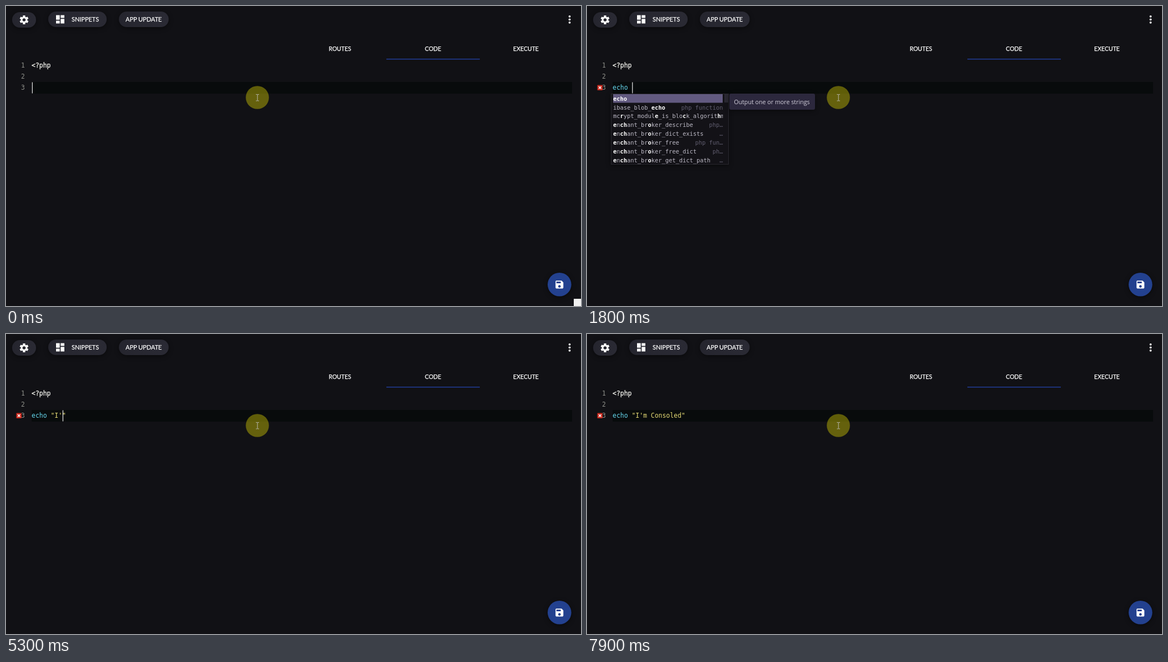
An HTML page for the animation above (8 s loop, 1034 by 541 pixels).

```html
<!DOCTYPE html>
<html lang="en">
<head>
<meta charset="utf-8">
<title>Code editor</title>
<style>
html, body { margin: 0; width: 100%; height: 100%; overflow: hidden; background: #111115; }
svg { display: block; width: 1034px; height: 541px; }
text { white-space: pre; }
.ui { font: 10.5px Lato, sans-serif; fill: #fff; stroke: #fff; stroke-width: .25; }
.btn { font-size: 10.95px; }
.code { font: 11.43px "DejaVu Sans Mono", monospace; fill: #f8f8f2; }
.num { fill: #8f908a; text-anchor: end; }
.row { font: 10.38px "DejaVu Sans Mono", monospace; fill: #bdbac6; }
.row .hit { font-weight: bold; fill: #fff; }
.row.on { fill: #a9a3bb; }
.row.meta { fill: #615e70; text-anchor: end; }
.tip { font: 10.69px "Open Sans", sans-serif; fill: #d3d0dc; }
.pop { filter: drop-shadow(0 2px 4px rgba(0, 0, 0, .45)); }
</style>
</head>
<body>
<svg viewBox="0 0 1034 541">
  <defs>
    <linearGradient id="pill" x1="0" x2="1">
      <stop offset="0" stop-color="#25252e"/><stop offset="1" stop-color="#2a2a34"/>
    </linearGradient>
  </defs>
  <rect width="1034" height="541" fill="#111115"/>
  <g class="pop" fill="url(#pill)">
    <rect x="11" y="11" width="43" height="28" rx="14"/>
    <rect x="76" y="10" width="105" height="28" rx="14"/>
    <rect x="203" y="10" width="89.500" height="28" rx="14"/>
  </g>
  <g id="gear" transform="translate(32.500 25)" fill="#fff"></g>
  <path fill="#fff" transform="translate(87.500 14) scale(.83)" d="M3 13h8V3H3zm0 8h8v-6H3zm10 0h8V11h-8zm0-18v6h8V3z"/>
  <text class="ui btn" x="118" y="27.500">SNIPPETS</text>
  <text class="ui btn" x="215" y="27.500">APP UPDATE</text>
  <g fill="#fff">
    <circle cx="1013.500" cy="18.800" r="1.900"/><circle cx="1013.500" cy="24.300" r="1.900"/><circle cx="1013.500" cy="29.800" r="1.900"/>
  </g>
  <g class="ui" text-anchor="middle">
    <text x="600.500" y="81">ROUTES</text><text x="768" y="81">CODE</text><text x="935" y="81">EXECUTE</text>
  </g>
  <rect x="684" y="95" width="168" height="1.500" fill="#213c98"/>
  <rect x="46" y="137" width="972" height="21" fill="#080b0c"/>
  <g class="code">
    <text class="num" x="34" y="110.600">1</text>
    <text class="num" x="34" y="131">2</text>
    <text class="num" x="34" y="151.200">3</text>
    <text x="46" y="110.600" stroke="#f8f8f2" stroke-width=".25">&lt;?php</text>
  </g>
  <g class="pop"><circle cx="995.300" cy="502.300" r="21.300" fill="#23418f"/></g>
  <path fill="#fff" transform="translate(985.900 493) scale(.78)" d="M17 3H5c-1.110 0-2 .9-2 2v14c0 1.100.89 2 2 2h14c1.100 0 2-.9 2-2V7l-4-4zm-5 16c-1.660 0-3-1.340-3-3s1.340-3 3-3 3 1.340 3 3-1.340 3-3 3zm3-10H5V5h10v4z"/>
  <g id="live"></g>
</svg>
<script>
const LOOP = 8000, CHAR = 6.88, LEFT = 46, ROW = 15.87;

// '*' toggles the matched letters; '|' separates the right-hand label
const lists = {
  e: { x: 43, thumb: 8, meta: 'php function', rows: ['*e*aster_days', '*e*nd', '*e*xp', '*e*ach', '*e*cho', '*e*reg', '*e*xec', '*e*mpty'] },
  ec: { x: 43, thumb: 10, meta: 'php function', rows: ['local*ec*onv', '*ec*ho', 'd*ec*bin', 'd*ec*hex', 'd*ec*oct', '*e*xe*c*', '*e*a*c*h', 'ex*ec*'] },
  ech: { x: 43, thumb: 13, meta: 'php function', rows: ['d*ech*ex', '*ech*o', 'ibase_blob_*ech*o', 'imag*ech*ar', 'imag*ech*arup',
    'mssql_f*e*t*ch*_array|php funct…', 'birdst*e*p_fet*ch*', 'cl*e*arstat*c*ac*h*e'] },
  echo: { x: 43, thumb: 15, meta: 'php function', rows: ['*echo*', 'ibase_blob_*echo*', 'mc*r*ypt_modul*e*_is_blo*c*k_algorit*h*m|',
    '*e*n*ch*ant_br*o*ker_describe|php…', '*e*n*ch*ant_br*o*ker_dict_exists|…', '*e*n*ch*ant_br*o*ker_free|php fun…',
    '*e*n*ch*ant_br*o*ker_free_dict|ph…', '*e*n*ch*ant_br*o*ker_get_dict_path|…'] },
  i: { x: 84, thumb: 77, meta: 'snippet', rows: ['*i*fe', 'http_red*i*rect', 'foreach*i*l', 'sw*i*tch', 'else*i*f', '*i*feil', 'foreachk*i*l', '*i*fil'] },
  m: { x: 97, rows: ['s*m*'] },
  co: { x: 111, rows: ['*co*nst'] },
  con: { x: 111, rows: ['*con*st'] },
  cons: { x: 111, rows: ['*cons*t'] }
};

const tips = {
  days: { w: 406, text: 'Get number of days after March 21 on which Easter falls for a given year' },
  locale: { w: 356, text: 'Returns numeric formatting information based on the current locale' },
  hex: { w: 134, text: 'Decimal to hexadecimal' },
  echo: { w: 154, text: 'Output one or more strings' },
  ife: { w: 133, title: 'ife', text: 'if (${1:/* condition */}) {\n\t${2:// code...}\n} else {\n\t${3:// code...}\n}\n${4}' },
  sm: { w: 227, title: 'sm', text: '/**\n * Sets the value of ${1:foo}\n *\n * @param ${2:$1} $$1 ${3:description}\n *\n * @return ${4:$FILENAME}\n */\n' +
    '${5:public} function set${6:$2}(${7:$2 }$$1)\n{\n\t$this->${8:$1} = $$1;\n\treturn $this;\n}${9}' }
};

// time, line text, caret column, caret opacity, list, tip
const steps = [
  [0, '', 0, 1],
  [600, 'e', 1, 1],
  [700, 'e', 1, 1, 'e'],
  [900, 'e', 1, 1, 'e', 'days'],
  [1100, 'ec', 2, 1, 'ec', 'locale'],
  [1200, 'ech', 3, 1, 'ech', 'locale'],
  [1300, 'ech', 3, 1, 'ech', 'hex'],
  [1400, 'echo', 4, 1, 'echo', 'hex'],
  [1500, 'echo', 4, 1, 'echo', 'echo'],
  [1800, 'echo ', 5, 1, 'echo', 'echo'],
  [1900, 'echo ', 5, 1],
  [2300, 'echo ', 5, .4],
  [2400, 'echo ""', 6, 1],
  [2900, 'echo ""', 6, .4],
  [3000, 'echo "I"', 7, 1, 'i', 'ife'],
  [3500, 'echo "I"', 7, .4, 'i', 'ife'],
  [3600, 'echo "I"', 7, 0, 'i', 'ife'],
  [3700, 'echo "I\'"', 8, 1],
  [4200, 'echo "I\'"', 8, .4],
  [4300, 'echo "I\'"', 8, 0],
  [4400, 'echo "I"', 7, 1],
  [4900, 'echo "I"', 7, .4],
  [5000, 'echo "I"', 7, 0],
  [5300, 'echo "I\'"', 8, 1],
  [5600, 'echo "I\'m"', 9, 1, 'm', 'sm'],
  [5700, 'echo "I\'m "', 10, 1, 'm', 'sm'],
  [6100, 'echo "I\'m C"', 11, 1],
  [6300, 'echo "I\'m Co"', 12, 1, 'co'],
  [6600, 'echo "I\'m Con"', 13, 1, 'con'],
  [6700, 'echo "I\'m Cons"', 14, 1, 'cons'],
  [6800, 'echo "I\'m Conso"', 15, 1],
  [7000, 'echo "I\'m Console"', 17, 1],
  [7300, 'echo "I\'m Consoled"', 18, 1],
  [7900, 'echo "I\'m Consoled"', 18, 0]
];

const rect = (x, y, w, h, fill, more = '') => `<rect x="${x}" y="${y}" width="${w}" height="${h}" fill="${fill}" ${more}/>`;
const label = (cls, x, y, body, more = '') => `<text class="${cls}" x="${x}" y="${y}" ${more}>${body}</text>`;

function drawLine(text, col, opacity) {
  const split = text.startsWith('echo') ? 4 : 0;
  const rest = split ? '#e6db74' : '#f8f8f2';
  return label('code', LEFT, 151.2, `<tspan fill="#66d9ef">${text.slice(0, split)}</tspan><tspan fill="${rest}">${text.slice(split)}</tspan>`)
    + rect(LEFT + .8 + col * CHAR, 137.5, 1.1, 20, '#fff', `opacity="${opacity}"`);
}

function drawError() {
  return rect(18.5, 142.5, 9.5, 9.5, '#c9281c', 'rx="1"')
    + '<path d="M21 145l4.500 4.500m0-4.500l-4.500 4.500" stroke="#fff" stroke-width="1.500"/>';
}

function drawList({ x, rows, thumb, meta }) {
  const h = rows.length * ROW;
  let out = rect(x + .5, 158.5, 211, h, '#131217', 'stroke="#29282f"')
    + rect(x + 4, 159, thumb ? 197 : 205, 15.5, '#625a80')
    + `<clipPath id="cut"><rect x="${x}" y="158" width="201.500" height="${h}"/></clipPath>`;
  if (thumb) out += rect(x + 204, 159, 7, thumb, '#2a2832');
  rows.forEach((row, i) => {
    const y = 170.7 + i * ROW;
    const [name, tag = meta] = row.split('|');
    const body = name.split('*').map((s, k) => k % 2 ? `<tspan class="hit">${s}</tspan>` : s).join('');
    out += `<g clip-path="url(#cut)">${label(i ? 'row' : 'row on', x + 4, y, body)}</g>`;
    if (i && tag) out += label('row meta', x + 201.5, y, tag);
  });
  return `<g class="pop">${out}</g>`;
}

function drawTip({ w, title, text }, listX) {
  const x = listX + 213, lines = text.split('\n');
  const h = title ? 41.5 + lines.length * 15.17 : 29;
  let out = rect(x, 158, w, h, '#2c283d', 'rx="3"');
  if (title) {
    out += label('tip', x + 8.5, 177, title, 'font-weight="bold" style="font-weight:bold"')
      + rect(x + 8.5, 186.2, w - 17, 1.5, '#d3d0dc');
  }
  lines.forEach((s, i) => {
    const tab = s.startsWith('\t') ? 25 : 0;
    out += label('tip', x + 8.2 + tab, (title ? 205.2 : 177.2) + i * 15.17, s.trimEnd().replace('\t', ''));
  });
  return `<g class="pop">${out}</g>`;
}

function drawPointer(arrow) {
  const halo = (x, y) => `<circle cx="${x}" cy="${y}" r="20.800" fill="#f5e800" fill-opacity=".37"/>`;
  return arrow
    ? halo(455, 171) + '<path d="M450.700 164v13.200l3-2.800 2 4.500 2-.9-2-4.300h4.200z" fill="#fff" stroke="#222" stroke-width=".7"/>'
    : halo(452, 165) + '<path d="M449.500 159.500h2l.7.600.7-.6h2M452.200 160v10.500M449.500 171h2l.7-.6.700.6h2" fill="none" stroke="#b9b8b0"/>';
}

function draw([time, text, col, opacity, list, tip]) {
  const covered = tip && lists[list].x + 213 + tips[tip].w > 452;
  return drawLine(text, col, opacity)
    + (time >= 1500 ? drawError() : '')
    + (list ? drawList(lists[list]) : '')
    + (tip ? drawTip(tips[tip], lists[list].x) : '')
    + drawPointer(covered)
    + (time < 900 ? rect(1021, 528, 13, 13, '#f0f0f0') : '');
}

const teeth = [0, 60, 120].map(a => rect(-2.1, -8, 4.2, 16, '#fff', `rx=".6" transform="rotate(${a})"`)).join('');
document.getElementById('gear').innerHTML = teeth + '<circle r="5.900"/><circle r="2.800" fill="#27272f"/>';

const live = document.getElementById('live');
let shown = null;
function tick() {
  const t = performance.now() % LOOP;
  const step = steps.findLast(s => s[0] <= t);
  if (step !== shown) live.innerHTML = draw(shown = step);
  requestAnimationFrame(tick);
}
tick();
</script>
</body>
</html>
```
